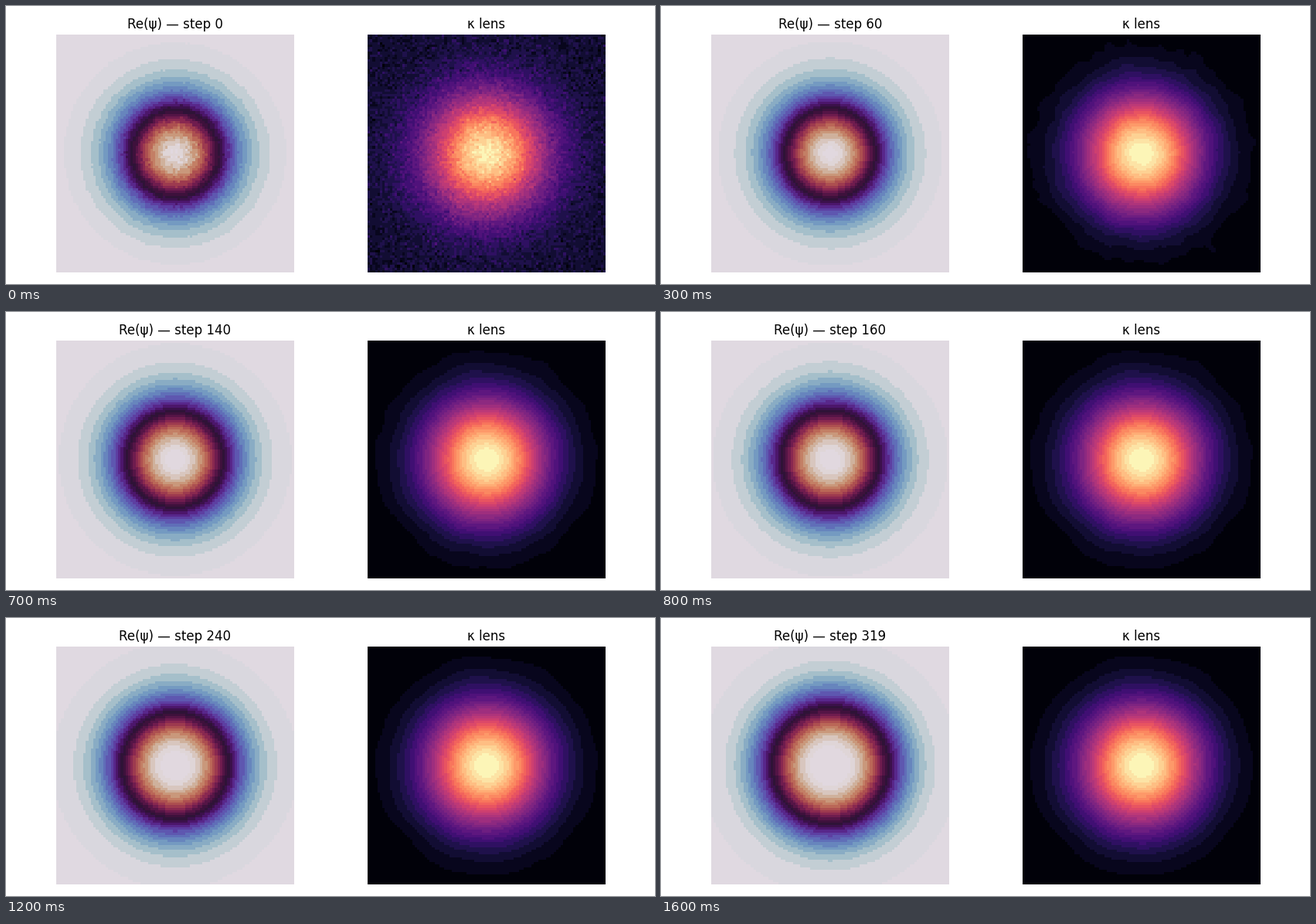
Write a matplotlib script that moves like this. It is 840 px wide and 360 px high and loops after 1700 ms.

```python
import numpy as np
import matplotlib.pyplot as plt
from matplotlib.animation import FuncAnimation
from matplotlib.colors import BoundaryNorm, ListedColormap

W, H, DPI = 840, 360, 100
N, FRAMES, LAST_STEP = 96, 17, 319
SIDE, TOP, LEFTS = 308, 37, (65, 468)

axis = np.arange(N) - (N - 1) / 2
radius = np.hypot(*np.meshgrid(axis, axis))

rng = np.random.default_rng(42)
noise_hat = np.fft.fft2(rng.normal(0, 0.03, (N, N)))
freq = 2 * np.pi * np.fft.fftfreq(N)
k2 = freq[:, None] ** 2 + freq[None, :] ** 2


def diffused_noise(step):
    return np.fft.ifft2(noise_hat * np.exp(-k2 * 0.025 * step)).real


def lens(step):
    """Gaussian bump plus noise, both slowly diffusing, scaled to 0..1."""
    k = np.exp(-radius**2 / (564 + 0.1 * step)) + diffused_noise(step)
    return (k - k.min()) / np.ptp(k)


def wave(step):
    """Gaussian whose contours drift outwards as the packet grows."""
    drift = 5.6 * (step / LAST_STEP) ** 1.55
    start = np.linspace(0, 90, 400)
    gain = np.interp(start, [0, 26, 38, 45], [1, 1, 0.72, 1.25])
    origin = np.interp(radius, start + drift * gain, start)
    psi = np.exp(-origin**2 / 461) * (1 + 0.6 * diffused_noise(step))
    return psi / psi.max()


def banded(name, edges):
    """Colormap and norm that show flat bands between the edges."""
    mids = (edges[1:] + edges[:-1]) / 2
    colors = plt.get_cmap(name)(mids)
    return dict(cmap=ListedColormap(colors), norm=BoundaryNorm(edges, len(mids)))


wave_edges = np.r_[0, 0.0125, np.linspace(0.042, 0.958, 24), 0.9875, 1]
lens_edges = np.linspace(0, 1, 27)

plt.rcParams["font.family"] = "DejaVu Sans"
fig = plt.figure(figsize=(W / DPI, H / DPI), dpi=DPI, facecolor="white")


def panel(left, data, style):
    ax = fig.add_axes([left / W, 1 - (TOP + SIDE) / H, SIDE / W, SIDE / H])
    ax.axis("off")
    return ax, ax.imshow(data, interpolation="nearest", aspect="auto", **style)


wave_ax, wave_im = panel(LEFTS[0], wave(0), banded("twilight", wave_edges))
lens_ax, lens_im = panel(LEFTS[1], lens(0), banded("magma", lens_edges))
title = wave_ax.set_title("", fontsize=12)
lens_ax.set_title("κ lens", fontsize=12)


def update(i):
    step = min(20 * i, LAST_STEP)
    wave_im.set_data(wave(step))
    lens_im.set_data(lens(step))
    title.set_text(f"Re(ψ) — step {step}")
    return wave_im, lens_im, title


anim = FuncAnimation(fig, update, frames=FRAMES, interval=100, repeat=True,
                     repeat_delay=0, blit=False)
plt.show()
```
